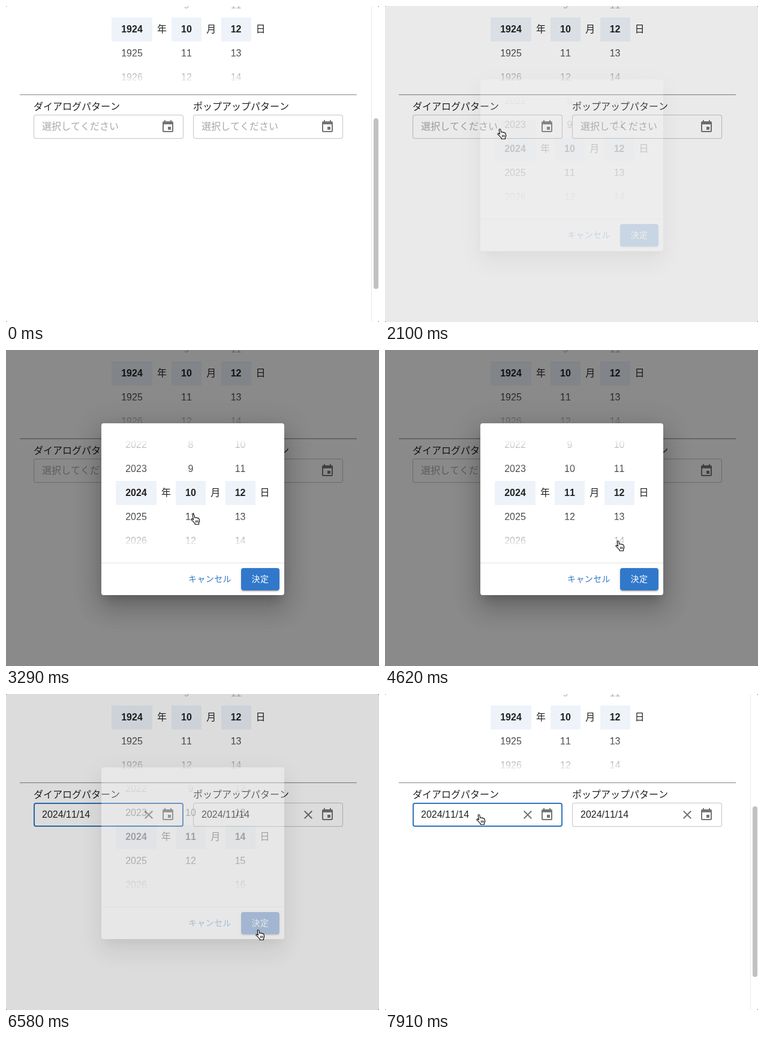
These frames come from a looping animation (622 by 526 pixels, 8000 ms). An HTML page:

```html
<!DOCTYPE html>
<html lang="ja">
<head>
<meta charset="utf-8">
<style>
html, body { margin: 0; width: 100%; height: 100%; overflow: hidden; background: #222; }
#stage { position: relative; width: 622px; height: 526px; overflow: hidden; border-radius: 2px; background: #fff;
  font: 16px/40px "Liberation Sans", "Noto Sans CJK JP", "Noto Sans CJK", sans-serif; font-kerning: none; color: #212121; }
#stage div, #stage svg { position: absolute; box-sizing: border-box; white-space: nowrap; }
.col { height: 200px; overflow: hidden; text-align: center;
  -webkit-mask-image: linear-gradient(transparent 10px, #0005 26px, #000c 60px, #000 80px, #000 120px, #000c 140px, #0005 174px, transparent 190px);
  mask-image: linear-gradient(transparent 10px, #0005 26px, #000c 60px, #000 80px, #000 120px, #000c 140px, #0005 174px, transparent 190px); }
.col div { width: 100%; height: 40px; }
.col .on { font-weight: bold; background: #eef3fa; }
.unit { width: 20px; text-align: center; }
.label { top: 158px; line-height: 20px; }
.field { top: 181px; width: 250px; height: 40px; border-radius: 4px; box-shadow: inset 0 0 0 1px var(--edge, #c4c4c4); }
.field div { left: 14px; }
.field svg { top: 8px; fill: #757575; }
.date { left: 212px; }
.clear { left: 180px; }
#rule { left: 23px; top: 147px; width: 562px; height: 2px; background: linear-gradient(#999 50%, #e4e4e4 50%); }
#top { width: 609px; height: 6px; background: #fff9; }
#bar { left: 609px; top: 0; width: 13px; height: 526px; border-left: 1px solid #e8e8e8; }
#bar div { left: 3px; top: 187px; width: 8px; height: 284px; border-radius: 4px; background: #c1c1c1; }
#shade { inset: 0; background: rgba(0, 0, 0, .46); }
#dialog { inset: 0; }
#paper { left: 159px; top: 122px; width: 305px; height: 286px; border-radius: 4px; background: #fff;
  box-shadow: 0 11px 15px -7px #0003, 0 24px 38px 3px #00000024, 0 9px 46px 8px #0000001f; }
#line { left: 159px; top: 354px; width: 305px; height: 1px; background: #e2e2e2; }
#hover { background: #f2f2f2; }
.button { font-size: 14px; line-height: 37px; letter-spacing: .4px; top: 363px; height: 37px; color: #3178c9; }
#ok { left: 392px; width: 64px; border-radius: 4px; text-align: center; color: #fff;
  box-shadow: 0 3px 1px -2px #0003, 0 2px 2px #00000024, 0 1px 5px #0000001f; }
#ring { width: 60px; height: 60px; margin: -30px; border: 2px solid #0008; border-radius: 50%; }
#cursor { left: 0; top: 0; overflow: visible; }
</style>
</head>
<body>
<div id="stage">
  <div id="page"></div>
  <div id="top"></div>
  <div id="rule"></div>
  <div id="bar"><div></div></div>
  <div id="shade"></div>
  <div id="dialog">
    <div id="paper"></div><div id="hover"></div><div id="wheels"></div><div id="line"></div>
    <div class="button" style="left:304px">キャンセル</div>
    <div class="button" id="ok">決定</div>
  </div>
  <div id="ring"></div>
  <svg id="cursor" width="18" height="20" stroke-linejoin="round">
    <g id="hand" fill="#fff" stroke="#000" stroke-width="1.1">
      <path d="M-.8 1.2Q-.8-.3.4-.3Q1.7-.3 1.9 1.2L2.8 5.3Q4 4.2 5.3 5.4Q6.6 4.6 7.6 6Q9.4 5.6 10 7.2L10.7 10.2Q10.9 12.2 9.5 14.2V16.3H3.2V14.8Q1 13 -.4 10.8L-2.8 8.8Q-3.4 7.5-2.2 7.1Q-1 7 .5 8.4Z"/>
      <path d="M4.5 9.6v3.6M6.4 9.6v3.6M8.3 9.6v3.6" fill="none" stroke-width=".9"/>
    </g>
    <path id="arrow" d="M0 0V14.5L3.3 11.4L5.5 16.5L7.9 15.5L5.7 10.5H10.2Z" stroke="#fff"/>
  </svg>
</div>
<script>
const $ = id => document.getElementById(id);
const CALENDAR = 'M17 12h-5v5h5v-5zM16 1v2H8V1H6v2H5c-1.11 0-1.99.9-1.99 2L3 19c0 1.1.89 2 2 2h14c1.1 0 2-.9 2-2V5c0-1.1-.9-2-2-2h-1V1h-2zm3 18H5V8h14v11z';
const CROSS = 'M19 6.41 17.59 5 12 10.59 6.41 5 5 6.41 10.59 12 5 17.59 6.41 19 12 13.41 17.59 19 19 17.59 13.41 12z';

function add(parent, cls, css, html = '') {
  const el = document.createElement('div');
  el.className = cls;
  el.style.cssText = css;
  el.innerHTML = html;
  return parent.appendChild(el);
}

// Returns a setter: value in the middle, value highlighted
function column(parent, x, mid, width, first, last) {
  const col = add(parent, 'col', `left:${x}px;top:${mid - 100}px;width:${width}px`);
  const items = [];
  for (let n = first; n <= last; n++) items.push(add(col, '', '', n));
  return (value, chosen = value) => items.forEach((el, i) => {
    el.style.top = 80 + (first + i - value) * 40 + 'px';
    el.className = first + i === chosen ? 'on' : '';
  });
}

function picker(parent, x, mid, firstYear, lastYear) {
  ['年', '月', '日'].forEach((unit, i) =>
    add(parent, 'unit', `left:${x + 74 + i * 82.3}px;top:${mid - 20}px`, unit));
  return [
    column(parent, x, mid, 68, firstYear, lastYear),
    column(parent, x + 100, mid, 50, 1, 12),
    column(parent, x + 182.6, mid, 50, 1, 31)
  ];
}

function field(x, label) {
  add($('page'), 'label', `left:${x}px`, label);
  const icon = (cls, d) => `<svg class="${cls}" width="24" height="24"><path d="${d}"/></svg>`;
  const el = add($('page'), 'field', `left:${x}px`, '<div></div>' + icon('date', CALENDAR) + icon('clear', CROSS));
  return (filled, edge) => {
    const text = el.firstChild;
    text.textContent = filled ? '2024/11/14' : '選択してください';
    text.style.color = filled ? '#212121' : '#a8a8a8';
    el.lastChild.style.display = filled ? '' : 'none';
    el.style.boxShadow = edge ? `inset 0 0 0 ${edge}` : '';
  };
}

picker($('page'), 176, 39, 1924, 1928).forEach((set, i) => set([1924, 10, 12][i]));
const [year, month, day] = picker($('wheels'), 183, 238, 2020, 2028);
const dialogField = field(46, 'ダイアログパターン');
const popupField = field(312, 'ポップアップパターン');

// Pointer stops: time, x, y
const STOPS = [
  [280, 307, 530], [980, 196, 190], [1120, 205, 203], [1400, 191, 205],
  [2730, 191, 205], [3150, 313, 273], [3290, 312, 274], [4340, 312, 274],
  [4620, 388, 318], [5530, 388, 318], [5880, 420, 374], [6090, 420, 374],
  [6300, 420, 393], [6930, 420, 393], [7490, 134, 220], [7560, 134, 220], [7840, 156, 201]
];
const HANDS = [[1120, 2900], [3010, 5670], [5810, 7000], [7630, 8000]];
const CLICKS = [[1820, 1890], [3850, 3990], [4900, 5040], [6370, 6440]];

const within = (t, a, b) => t >= a && t < b;
const ramp = (t, a, b) => {
  const u = Math.min(1, Math.max(0, (t - a) / (b - a)));
  return u * u * (3 - 2 * u);
};
const any = (list, t) => list.some(([a, b]) => within(t, a, b));
const show = (el, on) => el.style.display = on ? '' : 'none';

function pointer(t) {
  const i = STOPS.findIndex(s => s[0] > t);
  if (i < 0) return STOPS[STOPS.length - 1].slice(1);
  if (!i) return [-50, -50];
  const [a, x, y] = STOPS[i - 1], [b, x2, y2] = STOPS[i];
  const u = ramp(t, a, b);
  return [x + (x2 - x) * u, y + (y2 - y) * u];
}

function draw(t) {
  const open = t < 4000 ? ramp(t, 2040, 2265) : 1 - ramp(t, 6455, 6655);
  $('shade').style.opacity = open < 1 && t > 4000 ? open * .95 : open;
  $('dialog').style.opacity = open;
  show($('bar'), !within(t, 2100, 6720));

  const filled = t >= 6440;
  const focused = within(t, 1820, 2100) || filled;
  dialogField(filled, focused ? '2px #3175bd' : within(t, 1260, 2100) ? '1px #212121' : '');
  popupField(filled);

  year(2024);
  month(10 + ramp(t, 3850, 4240), t < 4270 ? 10 : 11);
  day(12 + 2 * ramp(t, 4970, 5370), t < 5600 ? 12 : 14);

  const onYear = within(t, 2100, 2310), onMonth = within(t, 3850, 4410);
  show($('hover'), onYear || onMonth);
  $('hover').style.cssText += onYear
    ? ';left:183px;top:190px;width:68px;height:28px'
    : ';left:283px;top:258px;width:50px;height:40px';

  const dark = ramp(t, 5740, 5990);
  $('ok').style.background = `rgb(${49 - 5 * dark},${120 - 18 * dark},${203 - 16 * dark})`;

  const [x, y] = pointer(t), hand = any(HANDS, t);
  $('cursor').style.transform = `translate(${x}px,${y}px)`;
  show($('cursor'), t >= 350);
  show($('hand'), hand);
  show($('arrow'), !hand);
  show($('ring'), any(CLICKS, t));
  $('ring').style.left = x + 2 + 'px';
  $('ring').style.top = y + 1 + 'px';
}

function tick() {
  const t = performance.now() % 8000;
  draw(Math.min(113, Math.floor(t / 70)) * 70);
  requestAnimationFrame(tick);
}
tick();
</script>
</body>
</html>
```
